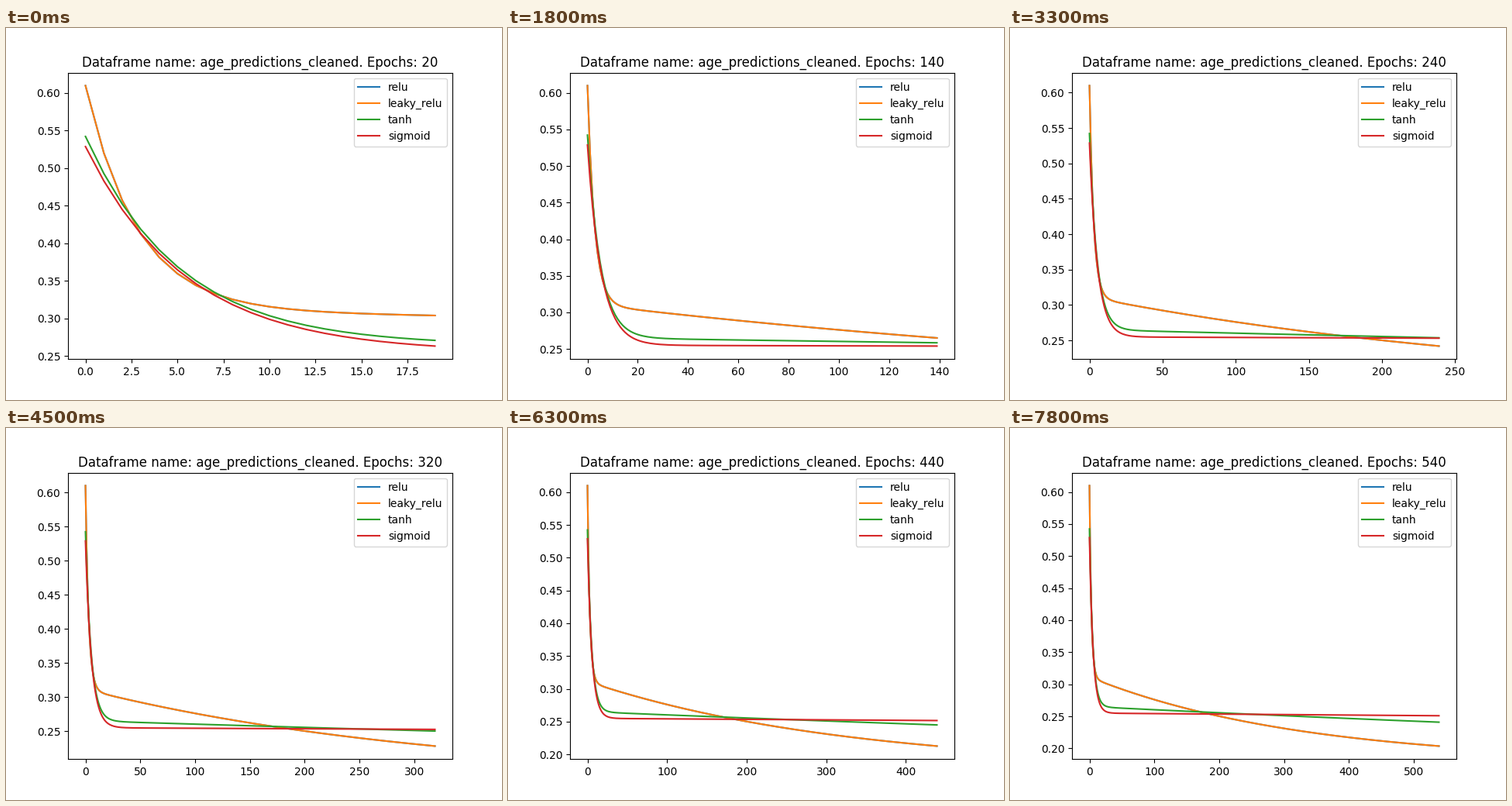
Write a matplotlib script that moves like this. It is 640 by 480 pixels and loops after 8 s.

```python
import matplotlib.pyplot as plt
import numpy as np
from matplotlib.animation import FuncAnimation

INTERVAL = 100        # ms per animation frame
HOLD = 3              # frames each plot stays on screen
FRAMES = 80
EPOCH_STEP = 20


def loss(t, floor, slow, tau, fast, ratio):
    """Slow exponential decay plus a quick initial drop."""
    return floor + slow * np.exp(-t / tau) + fast * ratio ** t


RELU = (0.1781, 0.1331, 326, 0.2987, 0.701)
CURVES = {
    "relu": RELU,
    "leaky_relu": RELU,
    "tanh": (0.1442, 0.1210, 2400, 0.2771, 0.822),
    "sigmoid": (0.1770, 0.0780, 10000, 0.2738, 0.833),
}

plt.rcParams["font.family"] = "DejaVu Sans"
fig, ax = plt.subplots(figsize=(6.4, 4.8), dpi=100)
lines = {name: ax.plot([], [], label=name)[0] for name in CURVES}
title = ax.set_title("")
ax.legend(loc="upper right")


def update(frame):
    epochs = EPOCH_STEP * (frame // HOLD + 1)
    t = np.arange(epochs)
    for name, line in lines.items():
        line.set_data(t, loss(t, *CURVES[name]))
    ax.relim()
    ax.autoscale_view()
    title.set_text(f"Dataframe name: age_predictions_cleaned. Epochs: {epochs}")
    return [*lines.values(), title]


anim = FuncAnimation(fig, update, frames=FRAMES, interval=INTERVAL,
                     repeat=True, repeat_delay=0, blit=False)
plt.show()
```
